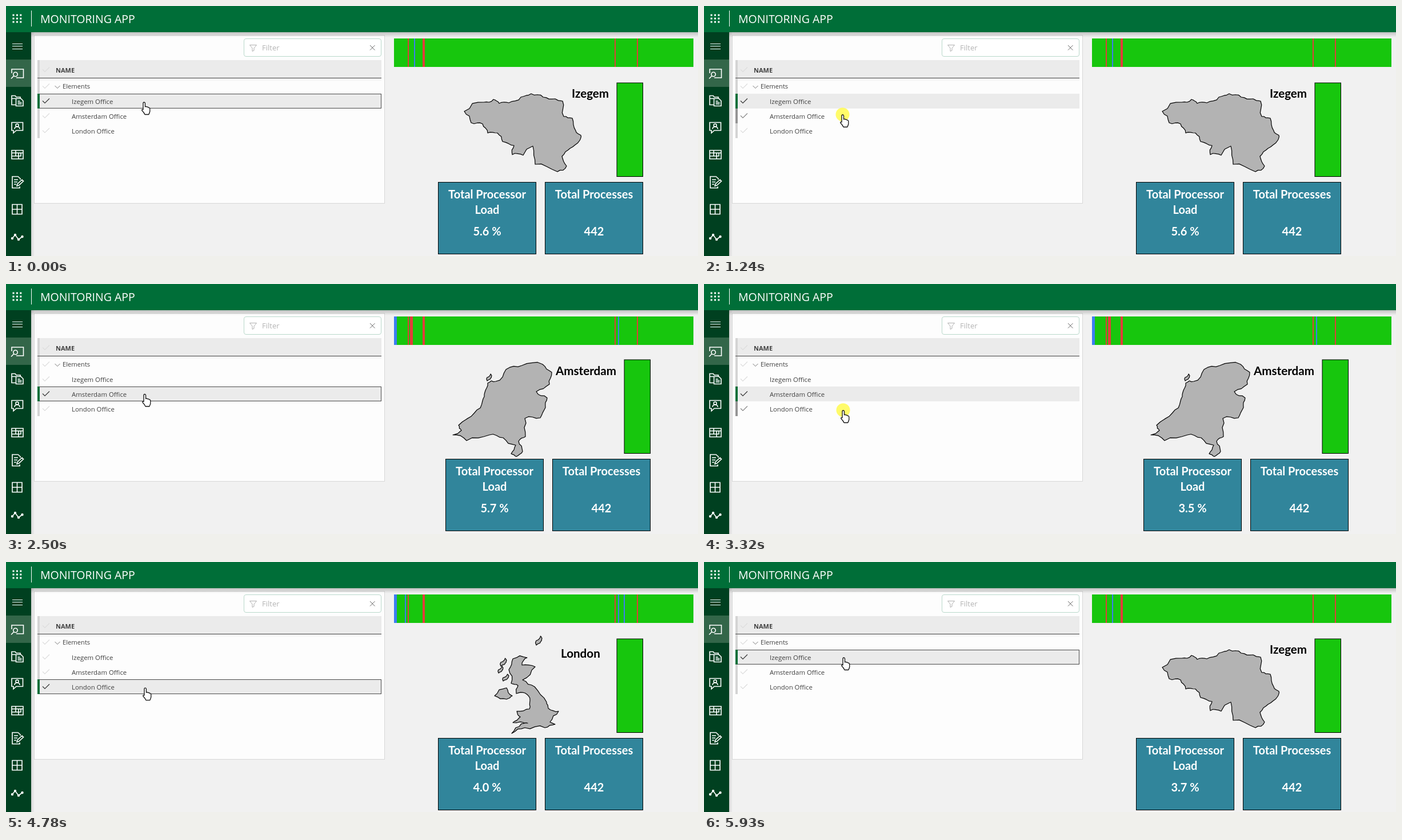
These frames come from a looping animation (1211 by 439 pixels, 6.41 s). An HTML page:

```html
<!DOCTYPE html>
<html lang="en">
<head>
<meta charset="utf-8">
<title>Monitoring app</title>
<style>
  html, body { margin: 0; width: 100%; height: 100%; overflow: hidden; background: #f1f1f1; }
  svg { display: block; }
  text { font-family: "Open Sans", "Noto Sans", sans-serif; font-size: 11.4px; fill: #404040; }
  .card text, .place { font: 700 20px Lato, sans-serif; }
  .card text { fill: #fff; text-anchor: middle; }
  .card rect { fill: #31859b; stroke: #000; }
  .place { font-size: 20.6px; fill: #000; }
  .icon { fill: none; stroke: #fff; stroke-width: 1.6; }
  .line { fill: none; }
  .land { fill: #b3b3b3; stroke: #000; stroke-width: 1.2; stroke-linejoin: round; }
</style>
</head>
<body>
<svg width="1211" height="439" viewBox="0 0 1211 439">
  <defs>
    <linearGradient id="down" x2="0" y2="1">
      <stop stop-opacity=".2"/><stop offset="1" stop-opacity="0"/>
    </linearGradient>
    <linearGradient id="right">
      <stop stop-opacity=".12"/><stop offset="1" stop-opacity="0"/>
    </linearGradient>
  </defs>
  <rect width="1211" height="439" fill="#f1f1f1"/>
  <rect x="49.5" y="51.5" width="613" height="295" fill="#fdfdfd" stroke="#d8d8d8"/>
  <rect x="44" y="46" width="1167" height="9" fill="url(#down)"/>
  <rect x="44" y="46" width="6" height="393" fill="url(#right)"/>

  <!-- header and side bar -->
  <rect width="1211" height="46" fill="#006e38"/>
  <rect y="46" width="44" height="393" fill="#004020"/>
  <rect y="94" width="44" height="48" fill="#336649"/>
  <path d="M44.5 8V36" stroke="#fff"/>
  <text x="60" y="30" style="font-size:19.5px;fill:#fff">MONITORING APP</text>
  <path d="M11.5 16h16M11.5 22h16M11.5 28h16" stroke="#fff" stroke-width="3" stroke-dasharray="3 3.4"/>
  <g class="icon">
    <path d="M11 66.5h18m-18 4h18m-18 5h18" stroke-width="1.1"/>
    <path d="M10 118v-7h20.5v15H18M9 127.500l4.500-4.500"/>
    <circle cx="16.5" cy="120" r="3.7"/>
    <path d="M17 173.500h-7v-16h6l2 2.500h7v2M10 162.500h7M17.500 162.500H26l4 4v9H17.500ZM20.500 167h4m-4 2.500h7m-7 2.500h7"/>
    <path d="M10 204.500h19.500v14H18l-5 4.500v-4.500h-3ZM15 216q0-4 4.500-4t4.500 4"/>
    <circle cx="19.5" cy="209.5" r="2.5"/>
    <path d="M10 253.500h20v15H10ZM10 258h20M10 263.500h12M17 253.500v10M22 258v10.500M26 258v5.500h-4"/>
    <path d="M25 305v-2l-4-3.500H11v20h13V317M14 305h7m-7 4h6m-6 4h4M19 316l1-3.500 8-7.500 2.500 2.500-8 7.500Z"/>
    <path d="M11 348.500h17v17H11ZM19.500 348.500v17M11 357h17"/>
    <path d="M11 408l5-6 6 8 6.500-5"/>
    <path d="M11 408h0M16 402h0M22 410h0M28.500 405h0" stroke-width="4.4" stroke-linecap="round"/>
  </g>

  <!-- filter and table head -->
  <rect x="416.5" y="57.5" width="240" height="31" rx="3.5" fill="#fff" stroke="#b9d8cb"/>
  <path class="line" d="M426.500 68.500h12l-4.500 5.500v4l-3 1.500V74Z" stroke="#b0b0b0"/>
  <path class="line" d="M637 69l8.500 8.500m0-8.500l-8.500 8.500" stroke="#666"/>
  <text x="448" y="78" style="font-size:13px;fill:#b4b4b4">Filter</text>
  <rect x="55" y="95" width="602" height="31" fill="#ebebeb"/>
  <rect x="55" y="127" width="602" height="5" fill="url(#down)" opacity=".4"/>
  <rect x="55" y="95" width="4" height="137" fill="#d4d4d4"/>
  <path d="M55 126.500h602" stroke="#4a4a4a"/>
  <text x="87" y="117" style="font-size:11px;font-weight:700">NAME</text>
  <path class="line" d="M64 111.500l4 4l8-8M64 140.500l4 4l8-8" stroke="#dcdcdc" stroke-width="1.1"/>
  <path class="line" d="M85.500 140l4.500 4.500l4.500-4.500" stroke="#777"/>
  <text x="99" y="145" style="font-size:11.2px">Elements</text>

  <g id="rows"></g>
  <g id="dashboard"></g>
  <g id="cursor">
    <circle id="click" cx="5" cy=".5" r="12" fill="#fffa50" opacity=".85"/>
    <path fill="#fff" stroke="#111" stroke-width="1.3" stroke-linejoin="round"
      d="M3.500 14V3q0-2 1.700-2T7 3v6q2-1.500 3 .5 2-1 2.700 1 2.600-.5 2.600 2.500v4q-.5 2.500-2 5.500H6.500q-1.500-3.500-5-7Q.5 13 3.500 14Z"/>
  </g>
</svg>
<script>
const LOOP = 6410, ROW_TOP = 154, ROW_HEIGHT = 26;
const RED = '#e23d3a', BLUE = '#3c7df2', GREEN = '#17c60d';
const $ = id => document.getElementById(id);

// Roughens an outline by pushing the middle of each edge sideways, twice.
function coast(corners) {
  let points = corners.split(' ').map(pair => pair.split(',').map(Number));
  let seed = 7;
  const random = () => (seed = seed * 16807 % 2147483647) / 2147483647 - .5;
  for (let pass = 0; pass < 2; pass++) {
    points = points.flatMap(([x, y], i) => {
      const [nx, ny] = points[(i + 1) % points.length], push = random() * .35;
      return [[x, y], [(x + nx) / 2 + (y - ny) * push, (y + ny) / 2 + (nx - x) * push]];
    });
  }
  return `<polygon class="land" points="${points.join(' ')}"/>`;
}

// A slanted island around (x, y).
const isle = (x, y, w, h) =>
  coast(`${x - w},${y + h} ${x - w},${y} ${x + w / 2},${y - h} ${x + w},${y - h / 2} ${x + w / 3},${y + h / 2}`);

// Stripes are [colour, x, width].
const commonStripes = [[RED, 703, 2], [RED, 729, 4], [RED, 1065, 2], [RED, 1104, 2]];
const laterStripes = [[BLUE, 679, 5], [BLUE, 1071, 2]];
const offices = [
  {
    name: 'Izegem', label: [990, 161], shift: [0, 0],
    stripes: [[BLUE, 714, 2]],
    land: coast('802,185 836,169 853,164 863,171 880,170 901,160 919,154 940,160 961,163 974,167 976,194 991,197 997,219 1006,227 1004,236 987,250 973,264 981,281 965,291 926,278 922,246 905,262 886,261 889,245 869,238 860,223 843,223 834,207 814,205')
  },
  {
    name: 'Amsterdam', label: [962, 160], shift: [13, -2],
    stripes: [...laterStripes, [RED, 707, 5]],
    land: coast('843,174 857,171 875,150 903,143 939,141 955,155 951,176 928,189 947,200 944,217 935,235 908,236 909,268 897,276 904,294 893,303 884,298 892,283 870,270 846,265 806,275 782,265 797,257 792,248 820,226 834,205 838,190') +
      isle(846, 164, 4, 6)
  },
  {
    name: 'London', label: [971, 168], shift: [0, 0],
    stripes: [...laterStripes, [BLUE, 698, 2], [BLUE, 1081, 2]],
    land: coast('887,170 912,168 903,181 926,184 904,207 925,219 946,246 949,257 967,262 952,281 961,285 943,291 908,291 885,301 902,284 913,283 887,282 900,272 894,262 916,258 917,243 908,230 893,231 896,217 884,213 880,189') +
      coast('855,235 876,221 886,235 876,241') +
      isle(866, 189, 4, 6) + isle(871, 176, 5, 7) + isle(875, 203, 5, 6) + isle(933, 138, 5, 8)
  }
];

// The cursor glides to y between the two move times, then clicks the office.
const visits = [
  { office: 1, move: [0, 600], y: 190, click: 1150, load: '5.7' },
  { office: 2, move: [2370, 3120], y: 221, click: 3320, load: '4.0' },
  { office: 0, move: [4720, 5560], y: 167, click: 5730, load: '3.7' }
];
const CLICK_TIME = 130, PAGE_DELAY = 200, REFRESH = 2700;

function sceneAt(t) {
  const scene = { x: 236.5, y: 168, selected: 0, page: 0, load: '5.6', clicking: false };
  for (const { office, move: [start, end], y, click, load } of visits) {
    const k = Math.min(1, Math.max(0, (t - start) / (end - start)));
    const ease = k * k * (3 - 2 * k);
    scene.x += ease;
    scene.y += (y - scene.y) * ease;
    if (t >= click && t < click + CLICK_TIME) scene.clicking = true;
    if (t >= click + CLICK_TIME) scene.selected = office;
    if (t >= click + PAGE_DELAY) Object.assign(scene, { page: office, load });
  }
  if (scene.page === 1 && t >= REFRESH) scene.load = '3.5';
  return scene;
}

function rowMarkup(name, i, selected, hovered) {
  const y = ROW_TOP + ROW_HEIGHT * i;
  const on = i === selected, over = i === hovered;
  const check = on ? '#333' : over ? '#858585' : '#dcdcdc';
  return (on ? `<rect x="55" y="${y}" width="602" height="26" fill="#ebebeb"/>` : '') +
    (on && over ? `<rect class="line" x="55.5" y="${y + .5}" width="601" height="25" stroke="#4a4a4a"/>` : '') +
    (on || over ? `<rect x="55" y="${y}" width="4" height="26" fill="${on ? '#006e38' : '#959595'}"/>` : '') +
    `<path class="line" d="M64 ${y + 12.5}l4 4l8-8" stroke="${check}" stroke-width="1.1"/>
     <text x="115" y="${y + 18}">${name} Office</text>`;
}

function card(x, lines, value) {
  const mid = x + 85.5;
  return `<g class="card"><rect x="${x}" y="309.5" width="171" height="126"/>` +
    lines.map((line, i) => `<text x="${mid}" y="${338 + 27 * i}">${line}</text>`).join('') +
    `<text x="${mid}" y="403">${value}</text></g>`;
}

function dashboardMarkup({ name, label, shift, stripes, land }, load) {
  return `<rect x="679" y="57" width="524" height="50" fill="${GREEN}"/>` +
    [...commonStripes, ...stripes].map(([color, x, w]) =>
      `<rect x="${x}" y="57" width="${w}" height="50" fill="${color}"/>`).join('') +
    land +
    `<text class="place" x="${label[0]}" y="${label[1]}">${name}</text>
     <g transform="translate(${shift})">
       <rect x="1069" y="135" width="45.5" height="164.5" fill="${GREEN}" stroke="#000"/>
       ${card(756.5, ['Total Processor', 'Load'], load + ' %')}
       ${card(943.5, ['Total Processes'], '442')}
     </g>`;
}

const shown = {};
function update(id, markup) {
  if (shown[id] !== markup) $(id).innerHTML = shown[id] = markup;
}

function draw() {
  const { x, y, selected, page, load, clicking } = sceneAt(performance.now() % LOOP);
  const hovered = Math.floor((y - ROW_TOP) / ROW_HEIGHT);
  update('rows', offices.map(({ name }, i) => rowMarkup(name, i, selected, hovered)).join(''));
  update('dashboard', dashboardMarkup(offices[page], load));
  $('cursor').setAttribute('transform', `translate(${x} ${y})`);
  $('click').style.display = clicking ? '' : 'none';
  requestAnimationFrame(draw);
}
draw();
</script>
</body>
</html>
```
